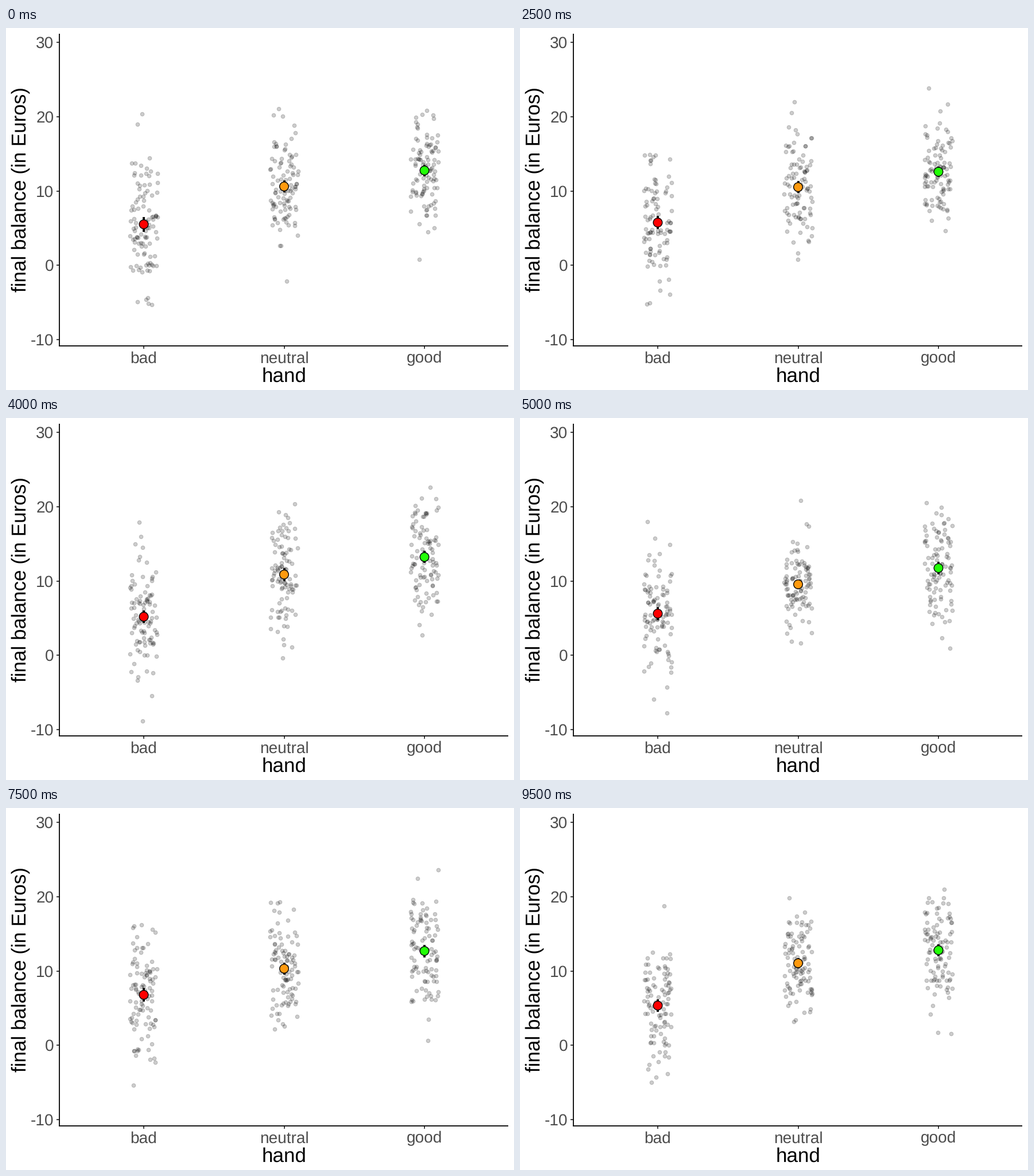
A matplotlib script for the animation above (10 s loop, 885 by 632 pixels).

```python
import matplotlib.pyplot as plt
import numpy as np
from matplotlib.animation import FuncAnimation

W, H, DPI = 885, 632, 100
PX = 72 / DPI  # points per pixel
LEFT, RIGHT, TOP, BOTTOM = 93.3, 875, 10, 554.8
TITLE_SIZE, LABEL_SIZE = 35.4, 28.3
FRAMES, INTERVAL = 20, 500
N = 100  # players per hand
JITTER = 24.5

# name, x position, fill, population mean, standard deviation
HANDS = [
    ("bad", 240, "#ff0000", 6.0, 4.7),
    ("neutral", 484.5, "#ff9a0f", 10.6, 4.1),
    ("good", 729, "#22ff06", 12.8, 4.1),
]
NAMES, CENTERS, FILLS, MEANS, SDS = zip(*HANDS)

plt.rcParams.update({
    "font.family": "Liberation Sans",
    "text.hinting": "none",
    "text.hinting_factor": 1,
})
fig = plt.figure(figsize=(W / DPI, H / DPI), dpi=DPI, facecolor="white")
ax = fig.add_axes([0, 0, 1, 1])
ax.set(xlim=(0, W), ylim=(H, 0))
ax.axis("off")


def to_y(value):
    return 414.3 - 12.97 * value


def line(xs, ys, color="black"):
    ax.plot(xs, ys, color=color, lw=1.8 * PX, solid_capstyle="butt")


def label(x, y, text, size, color="black", ha="center", **kwargs):
    ax.text(x, y, text, fontsize=size * PX, color=color, ha=ha,
            va="baseline", **kwargs)


def draw_axes():
    for value in range(-10, 31, 10):
        y = to_y(value)
        line([LEFT - 5, LEFT], [y, y], "#333333")
        label(83.5, y + 9.9, str(value), LABEL_SIZE, "#4d4d4d", ha="right")
    for x, name in zip(CENTERS, NAMES):
        line([x, x], [BOTTOM, BOTTOM + 5], "#333333")
        label(x, 584.3, name, LABEL_SIZE, "#4d4d4d")
    line([LEFT, LEFT], [TOP, BOTTOM + 0.9])
    line([LEFT - 0.9, RIGHT], [BOTTOM, BOTTOM])
    label((LEFT + RIGHT) / 2, 618, "hand", TITLE_SIZE)
    label(34.5, 281.8, "final balance (in Euros)", TITLE_SIZE, rotation=90,
          rotation_mode="anchor")


draw_axes()
shade = (0, 0, 0, 0.2)
dots = ax.scatter([], [], s=(6.6 * PX) ** 2, facecolor=[shade],
                  edgecolor=[shade], linewidth=PX, zorder=3)
bars = ax.vlines(CENTERS, 0, 0, color="black", lw=3.8 * PX, zorder=4)
points = ax.scatter(CENTERS, CENTERS, s=(15.6 * PX) ** 2, c=FILLS,
                    edgecolor="black", linewidth=1.4 * PX, zorder=5)


def update(i):
    """Draw a fresh random sample with its means and 95% intervals."""
    rng = np.random.default_rng(i)
    balances = rng.normal(MEANS, SDS, (N, len(HANDS)))
    xs = CENTERS + rng.uniform(-JITTER, JITTER, balances.shape)
    means = balances.mean(axis=0)
    margins = 1.96 * balances.std(axis=0) / np.sqrt(N)

    dots.set_offsets(np.c_[xs.ravel(), to_y(balances).ravel()])
    bars.set_segments([[(x, to_y(m - e)), (x, to_y(m + e))]
                       for x, m, e in zip(CENTERS, means, margins)])
    points.set_offsets(np.c_[CENTERS, to_y(means)])
    return dots, bars, points


anim = FuncAnimation(fig, update, frames=FRAMES, interval=INTERVAL,
                     repeat=True, repeat_delay=0)
plt.show()
```
